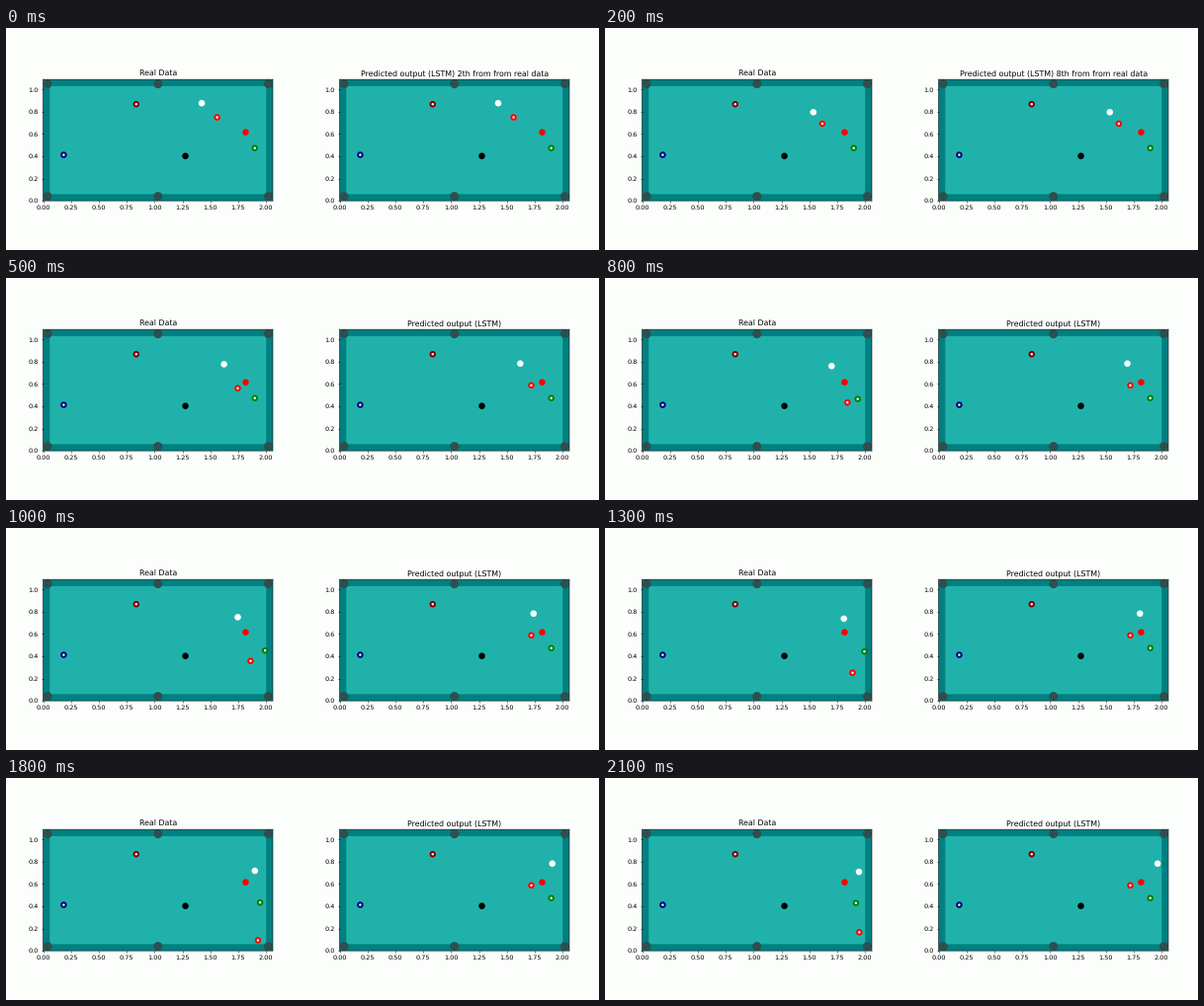
Write a matplotlib script that moves like this. It is 600 px wide and 225 px high and loops after 2.2 s.

```python
import numpy as np
import matplotlib.pyplot as plt
from matplotlib.animation import FuncAnimation
from matplotlib.patches import Circle, Rectangle

FRAMES, STEP_MS = 22, 100
TABLE_W, TABLE_H, CUSHION = 2.06, 1.09, 0.06
BALL_R, DOT_R, POCKET_R = 0.029, 0.0108, 0.04
LAST_SEEN = 4                    # last step still fed with real data

plt.rcParams.update({"text.hinting": "none", "path.snap": False})

# A leg is (first step, vx, vy, drag); it lasts until the next one begins
SHOT = [(0, .082, -.074, 0), (1, .032, -.0068, .04)]
CUE_PRED = SHOT + [(LAST_SEEN, .0256, 0, .02)]
RED_HIT = [(.7, .043, -.0437, 0)]
RED_REAL = RED_HIT + [(7, .0102, -.0405, .03)]
RED_PRED = RED_HIT + [(LAST_SEEN + .4, 0, 0, 0)]
GREEN_REAL = [(7, .038, -.009, .15), (11, -.0095, -.0018, 0)]


def roll(start, legs, step):
    pos = np.array(start)
    ends = [leg[0] for leg in legs[1:]] + [FRAMES]
    for (begin, vx, vy, drag), end in zip(legs, ends):
        span = np.clip(step - begin, 0, end - begin)
        glide = (1 - np.exp(-drag * span)) / drag if drag else span
        pos += glide * np.array([vx, vy])
    wall = CUSHION + BALL_R
    pos[1] = wall + abs(pos[1] - wall)       # bounce off the lower cushion
    return pos


class Ball:
    def __init__(self, ax, color, start, striped=False, legs=()):
        self.start, self.legs = start, legs
        self.parts = [Circle(start, BALL_R, color=color, lw=0, zorder=2)]
        if striped:
            self.parts.append(Circle(start, DOT_R, color="white", lw=0, zorder=2))
        for part in self.parts:
            ax.add_patch(part)

    def move(self, step):
        for part in self.parts:
            part.center = roll(self.start, self.legs, step)


def draw_table(ax):
    ax.set(xlim=(0, TABLE_W), ylim=(0, TABLE_H), aspect="equal", facecolor="teal")
    ax.add_patch(Rectangle((CUSHION, CUSHION), TABLE_W - 2 * CUSHION,
                           TABLE_H - 2 * CUSHION, color="lightseagreen", lw=0))
    for x in (POCKET_R, TABLE_W / 2, TABLE_W - POCKET_R):
        for y in (POCKET_R, TABLE_H - POCKET_R):
            ax.add_patch(Circle((x, y), POCKET_R, color="darkslategray", lw=0))


def rack(ax, cue, red, green):
    return [
        Ball(ax, "maroon", (.835, .8675), True),
        Ball(ax, "navy", (.185, .4125), True),
        Ball(ax, "black", (1.276, .4025)),
        Ball(ax, "red", (1.816, .6155)),
        Ball(ax, "green", (1.898, .4735), True, green),
        Ball(ax, "red", (1.560, .7495), True, red),
        Ball(ax, "white", (1.422, .8765), False, cue),
    ]


fig, (real, pred) = plt.subplots(1, 2, figsize=(12.8, 4.8), dpi=46.875,
                                 facecolor="#fcfefc")
# Each half of the stage keeps the default margins of a single plot
fig.subplots_adjust(left=.0625, right=.95, bottom=.11, top=.88, wspace=.225 / .775)
draw_table(real)
draw_table(pred)
real.set_title("Real Data")
title = pred.set_title("")
balls = rack(real, SHOT, RED_REAL, GREEN_REAL) + rack(pred, CUE_PRED, RED_PRED, ())


def update(step):
    for ball in balls:
        ball.move(step)
    text = "Predicted output (LSTM)"
    if step <= LAST_SEEN:
        text += f" {2 + 3 * step}th from from real data"
    title.set_text(text)


anim = FuncAnimation(fig, update, frames=FRAMES, interval=STEP_MS,
                     repeat=True, repeat_delay=0)
plt.show()
```
